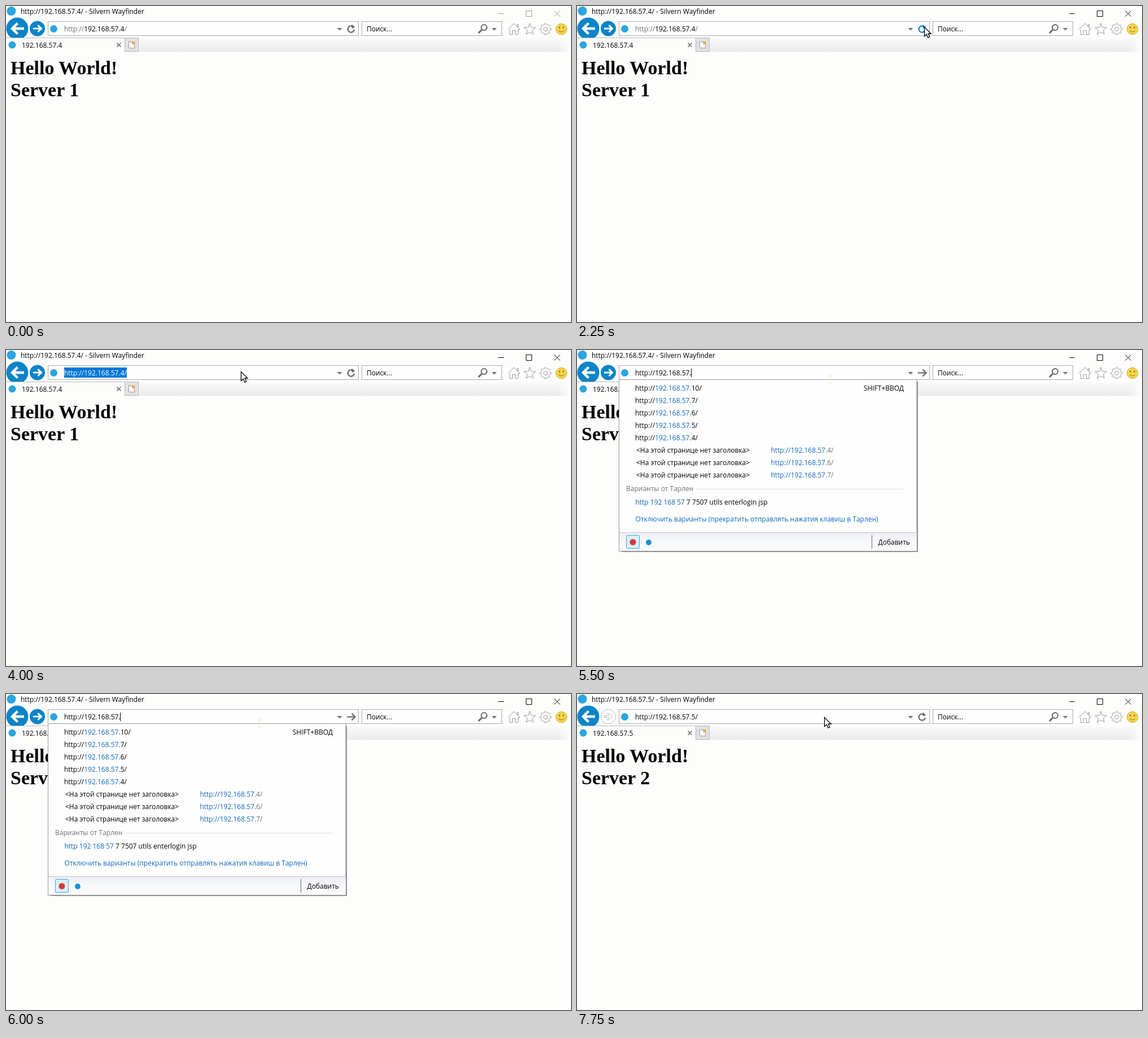
An HTML page for the animation above (8000 ms loop, 1001 px wide and 560 px high).

```html
<!DOCTYPE html>
<html lang="ru">
<head>
<meta charset="utf-8">
<title>Two servers</title>
<style>
html, body { margin: 0; width: 100%; height: 100%; overflow: hidden; background: #fdfdfc; }
svg { display: block; width: 1001px; height: 560px; }
text { font: 12px "Open Sans", "Noto Sans", sans-serif; fill: #000; white-space: pre; }
.page text { font: bold 34px "Liberation Serif", "Times New Roman", serif; }
.line { fill: none; stroke: currentColor; }
.grey { fill: #707070; }
.link { fill: #0f68bf; }
.italic { font-style: italic; }
.logo { fill: #2ba4de; }
.blue { fill: #0b84c6; }
.white { fill: #fff; }
.box { fill: #fefefe; stroke: #a8a8a8; }
.list { fill: #fefefe; stroke: #979797; }
.shadow { fill: #8c8c8c; }

/* Hard state changes: 1% = 80 ms */
.t { animation: 8s step-end infinite; }
.before { animation-name: before; }
.after { animation-name: after; }
.controls { animation-name: controls; }
.refresh { animation-name: refresh; }
.go { animation-name: go; }
.tip { animation-name: tip; }
.idle { animation-name: idle; }
.selected { animation-name: selected; }
.clicked { animation-name: clicked; }
.erased { animation-name: erased; }
.typed { animation-name: typed; }
.matched { animation-name: matched; }
.loaded { animation-name: loaded; }
.beam { animation-name: beam; }
.arrow { animation-name: arrow; }
@keyframes before { 0% { visibility: visible } 93.75% { visibility: hidden } }
@keyframes after { 0% { visibility: hidden } 93.75% { visibility: visible } }
@keyframes controls { 0% { color: #999 } 18.75% { color: #000 } }
@keyframes refresh {
  0% { color: #666; visibility: visible }
  15.625% { color: #0a7fd9; visibility: visible }
  43.75% { color: #666; visibility: visible }
  62.5% { color: #666; visibility: hidden }
  90.625% { color: #666; visibility: visible }
}
@keyframes go { 0% { visibility: hidden } 62.5% { visibility: visible } 90.625% { visibility: hidden } }
@keyframes tip { 0% { visibility: hidden } 31.25% { visibility: visible } 43.75% { visibility: hidden } }
@keyframes idle { 0% { visibility: visible } 50% { visibility: hidden } }
@keyframes selected { 0% { visibility: hidden } 50% { visibility: visible } 56.25% { visibility: hidden } }
@keyframes clicked { 0% { visibility: hidden } 56.25% { visibility: visible } 62.5% { visibility: hidden } }
@keyframes erased { 0% { visibility: hidden } 62.5% { visibility: visible } 68.75% { visibility: hidden } }
@keyframes typed { 0% { visibility: hidden } 68.75% { visibility: visible } 78.125% { visibility: hidden } }
@keyframes matched { 0% { visibility: hidden } 78.125% { visibility: visible } 90.625% { visibility: hidden } }
@keyframes loaded { 0% { visibility: hidden } 90.625% { visibility: visible } }
@keyframes beam { 0% { visibility: hidden } 56.25% { visibility: visible } 90.625% { visibility: hidden } }
@keyframes arrow {
  0% { visibility: hidden; transform: translate(20px, 505px) }
  3.125% { visibility: visible; transform: translate(20px, 505px) }
  6.25% { visibility: visible; transform: translate(210px, 330px) }
  9.375% { visibility: visible; transform: translate(430px, 150px) }
  12.5% { visibility: visible; transform: translate(590px, 20px) }
  15.625% { visibility: visible; transform: translate(615px, 37px) }
  43.75% { visibility: visible; transform: translate(580px, 38px) }
  46.875% { visibility: visible; transform: translate(534px, 38px) }
  50% { visibility: visible; transform: translate(416px, 38px) }
  53.125% { visibility: visible; transform: translate(438px, 41px) }
  56.25% { visibility: hidden; transform: translate(438px, 41px) }
  90.625% { visibility: visible; transform: translate(438px, 41px) }
}
</style>
</head>
<body>
<svg viewBox="0 0 1001 560">
  <defs>
    <linearGradient id="strip" x2="0" y2="1">
      <stop stop-color="#fafafa"/><stop offset="1" stop-color="#ebebec"/>
    </linearGradient>
    <linearGradient id="fade">
      <stop offset=".97" stop-color="#fdfdfc" stop-opacity="0"/><stop offset="1" stop-color="#fdfdfc"/>
    </linearGradient>
    <linearGradient id="foot" x2="0" y2="1">
      <stop stop-color="#eceef3"/><stop offset=".5" stop-color="#f8f9fb"/>
    </linearGradient>
    <path id="down" d="M-4.5 -2H4.5L0 2.5Z" fill="#707070"/>
    <text id="untitled" x="105">&lt;На этой странице нет заголовка&gt;</text>
    <text id="shortcut" x="579" y="72" text-anchor="end">SHIFT+ВВОД</text>
    <g id="tail">
      <text class="grey" x="87" y="250">Варианты от Тарлен</text>
      <path class="line" color="#ddddd2" d="M210 246.5H579"/>
      <text class="link" x="103.5" y="304">Отключить варианты (прекратить отправлять нажатия клавиш в Тарлен)</text>
      <path fill="url(#foot)" d="M75 324H602V356H75Z"/>
      <path class="line" color="#c4c6ca" d="M75 323.5H602"/>
      <rect x="87.5" y="328.5" width="23" height="23" rx="1.5" fill="#d9effb" stroke="#45a5d8"/>
      <circle cx="99" cy="340.500" r="5.5" fill="#d23a3a"/>
      <circle cx="127" cy="341" r="5" fill="#1b8fe0"/>
      <path class="line" color="#666" d="M522.5 328V352"/>
      <text x="533.5" y="345">Добавить</text>
    </g>
  </defs>
  <rect width="1001" height="560" fill="#fdfdfc"/>

  <!-- Title bar -->
  <circle class="logo" cx="9.5" cy="9" r="8"/>
  <text class="t before" x="26" y="13.5">http://192.168.57.4/ - Silvern Wayfinder</text>
  <text class="t after" x="26" y="13.5">http://192.168.57.5/ - Silvern Wayfinder</text>
  <path class="line t controls" d="M872 13.5H882M921.5 8.5H931.5V18.5H921.5ZM971.5 8.5L981.5 18.5M981.5 8.5L971.5 18.5"/>

  <!-- Navigation row -->
  <circle class="blue" cx="20" cy="40" r="19.5"/>
  <path class="line" color="#fff" stroke-width="4.5" d="M32 40H11M20.5 30.5L11 40L20.5 49.5"/>
  <g class="t before">
    <circle class="blue" cx="55.5" cy="40" r="13.5"/>
    <path class="line" color="#fff" stroke-width="3" d="M48 40H62M56.5 34L62.5 40L56.5 46"/>
  </g>
  <g class="t after">
    <circle cx="55.5" cy="40" r="13" fill="#fdfdfc" stroke="#bcbcbc"/>
    <path class="line" color="#bcbcbc" d="M48 38.5H57L53.5 34.5H57L63 40L57 45.5H53.5L57 41.5H48Z"/>
  </g>
  <rect class="box" x="74.5" y="27.5" width="550" height="25"/>
  <circle class="logo" cx="84.5" cy="40.5" r="6.5"/>
  <use href="#down" x="591" y="41"/>
  <g class="t refresh">
    <path class="line" stroke-width="2.2" d="M617 42A5.7 5.7 0 1 1 613.5 35.7"/>
    <path fill="currentColor" d="M612.5 32.5L618.5 37.5L612.5 39.5Z"/>
  </g>
  <path class="line t go" color="#777" stroke-width="2.5" d="M604 40.5H618M612.5 34.5L618.5 40.5L612.5 46.5"/>
  <rect class="box" x="630.5" y="27.5" width="248" height="25"/>
  <text x="639" y="45">Поиск...</text>
  <circle class="line" color="#666" cx="847" cy="38" r="5" stroke-width="2"/>
  <path class="line" color="#666" stroke-width="3" d="M843 42L837 48"/>
  <use href="#down" x="865" y="41"/>
  <g class="line" color="#9a9a9a">
    <path d="M889.5 41.5L900 31L910.5 41.5H907.5V50.5H902.5V43.5H897.5V50.5H892.5V41.5"/>
    <path d="M905.5 36V32.5H907.5V38"/>
    <path id="star"/>
    <path id="gear"/>
    <circle cx="956" cy="41" r="3.5"/>
  </g>
  <circle cx="984" cy="41" r="9.7" fill="#f7d548" stroke="#d3a632"/>
  <g color="#80661f" fill="#80661f">
    <ellipse cx="980.5" cy="38" rx="1.2" ry="1.8"/>
    <ellipse cx="987.5" cy="38" rx="1.2" ry="1.8"/>
    <path class="line" d="M979 43.500Q984 48.500 989 43.500"/>
  </g>

  <!-- Tab row -->
  <rect x="235" y="57" width="766" height="24" fill="url(#strip)"/>
  <rect x="235" y="57" width="766" height="24" fill="url(#fade)"/>
  <rect y="56" width="210" height="25" fill="#fdfdfc"/>
  <rect x="210.5" y="56.5" width="24" height="24" fill="#e2e2e2" stroke="#b8b8b8"/>
  <path class="line" color="#b8b8b8" d="M0 56.5H210"/>
  <circle class="logo" cx="11" cy="69" r="6.5"/>
  <text class="t before" x="28" y="73.5">192.168.57.4</text>
  <text class="t after" x="28" y="73.5">192.168.57.5</text>
  <path class="line" color="#858585" stroke-width="1.8" d="M196.5 65.5L203.5 72.5M203.5 65.5L196.5 72.5"/>
  <path class="white" stroke="#999" d="M217.5 63.5H224.5L227.5 66.5V74.5H217.5Z"/>
  <circle cx="226" cy="65.5" r="2.8" fill="#f0a840"/>

  <!-- Page -->
  <g class="page">
    <text x="8" y="121">Hello World!</text>
    <text class="t before" x="8" y="160">Server 1</text>
    <text class="t after" x="8" y="160">Server 2</text>
  </g>

  <!-- Address text -->
  <text class="t idle" x="103" y="45"><tspan class="grey">http://</tspan>192.168.57.4<tspan class="grey">/</tspan></text>
  <g class="t selected">
    <rect x="103" y="31" width="111" height="18" fill="#0078d7"/>
    <text class="white" x="103" y="45">http://192.168.57.4/</text>
  </g>
  <g class="t clicked">
    <text x="103" y="45">http://192.168.57.4/</text>
    <path class="line" d="M214.5 33V48"/>
  </g>
  <g class="t erased">
    <text x="103" y="45">http://192.168.57.4</text>
    <path class="line" d="M210.5 33V48"/>
  </g>
  <text class="t loaded" x="103" y="45">http://192.168.57.5/</text>

  <!-- Full suggestion list -->
  <g class="t typed">
    <text x="103" y="45">http://192.168.57.</text>
    <path class="line" d="M202.5 33V48"/>
    <path class="shadow" d="M79 56H604V358H79Z"/>
    <rect class="list" x="74.5" y="52.5" width="527.5" height="304"/>
    <text x="103" y="72">http://<tspan class="link">192.168.57.</tspan>10/</text>
    <text x="103" y="94">http://<tspan class="link">192.168.57.</tspan>7/</text>
    <text x="103" y="116">http://<tspan class="link">192.168.57.</tspan>6/</text>
    <text x="103" y="138">http://<tspan class="link">192.168.57.</tspan>5/</text>
    <text x="103" y="160">http://<tspan class="link">192.168.57.</tspan>4/</text>
    <use href="#shortcut"/>
    <use href="#untitled" y="182"/>
    <use href="#untitled" y="204"/>
    <use href="#untitled" y="226"/>
    <text class="link" x="343.5" y="182">http://192.168.57.<tspan class="grey">4/</tspan></text>
    <text class="link" x="343.5" y="204">http://192.168.57.<tspan class="grey">6/</tspan></text>
    <text class="link" x="343.5" y="226">http://192.168.57.<tspan class="grey">7/</tspan></text>
    <text x="103.5" y="274"><tspan class="link">http 192 168 57</tspan> 7 7507 utils enterlogin jsp</text>
    <use href="#tail"/>
  </g>

  <!-- Narrowed suggestion list -->
  <g class="t matched">
    <rect x="208.5" y="31" width="5.5" height="18" fill="#1464b4"/>
    <text x="103" y="45">http://192.168.57.5<tspan class="white">/</tspan></text>
    <path class="shadow" d="M79 56H604V226H79Z"/>
    <rect class="list" x="74.5" y="52.5" width="527.5" height="172"/>
    <text x="103" y="72">http://<tspan class="link">192.168.57.5</tspan>/</text>
    <use href="#shortcut"/>
    <use href="#untitled" y="94"/>
    <text class="link" x="343.5" y="94">http://192.168.57.5<tspan class="grey">/</tspan></text>
    <text class="grey italic" x="101" y="138">Нет результатов.</text>
    <use href="#tail" y="-132"/>
  </g>

  <!-- Tooltip and pointers -->
  <g class="t tip">
    <path class="shadow" d="M619 56H711.5V75H619Z"/>
    <rect class="white" x="615.5" y="52.5" width="94" height="20" stroke="#666"/>
    <text class="grey" x="620" y="67">Обновить (F5)</text>
  </g>
  <path class="line t beam" color="#ebe6cf" d="M445.5 43.5H452.5M449 43.5V58.5M445.5 58.5H452.5"/>
  <path class="white t arrow" stroke="#000" stroke-width="1.3" d="M.5 .5V16.5L4.3 13L7 19.2L9.8 18L7.2 12H12Z"/>
</svg>
<script>
// Closed outline around a centre, cycling through the given radii
function ring(id, cx, cy, count, radii, turn) {
  const points = Array.from({ length: count }, (_, i) => {
    const angle = (i / count + turn) * 2 * Math.PI, r = radii[i % radii.length];
    return (cx + r * Math.cos(angle)).toFixed(1) + " " + (cy + r * Math.sin(angle)).toFixed(1);
  });
  document.getElementById(id).setAttribute("d", "M" + points.join("L") + "Z");
}
ring("star", 928, 41.5, 10, [10.8, 4.5], -0.25);
ring("gear", 956, 41, 32, [10, 10, 7.6, 7.6], -1 / 64);
</script>
</body>
</html>
```
